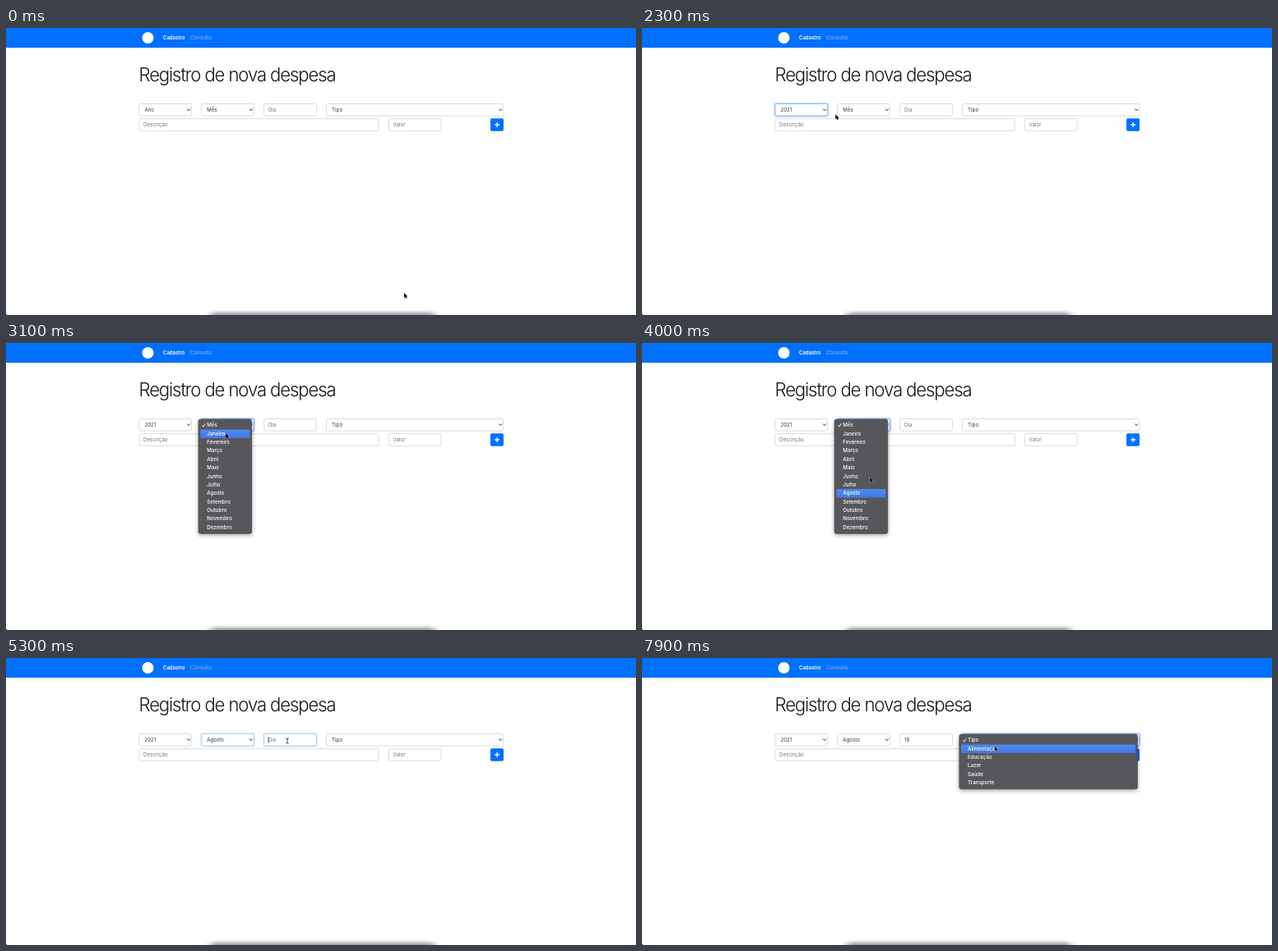
Write an HTML page that moves like this. It is 766x350 px and loops after 8 s.

```html
<!DOCTYPE html>
<html lang="pt">
<head>
<meta charset="utf-8">
<title>Registro de nova despesa</title>
<style>
html, body { margin: 0; width: 100%; height: 100%; overflow: hidden; background: #fff; }
svg { display: block; }
text { font: 6.2px Inter, "Open Sans", sans-serif; fill: #343a40; white-space: pre; }
.title { font-size: 22.2px; font-weight: 300; letter-spacing: -1.15px; fill: #16191c; }
.hint { fill: #6c757d; }
.item { fill: #fff; font-weight: 500; }
.box { fill: #fff; stroke: #ced4da; stroke-width: .8; }
.ring { fill: none; stroke: #007bff; stroke-opacity: .25; stroke-width: 1.4; }
.edge { fill: none; stroke: #80bdff; stroke-width: .8; }
.line { fill: none; stroke-linecap: round; stroke-linejoin: round; }
</style>
</head>
<body>
<svg id="stage" width="766" height="350" viewBox="0 0 766 350">
  <defs>
    <filter id="soft" x="-20%" y="-300%" width="140%" height="700%"><feGaussianBlur stdDeviation="5 2"/></filter>
    <filter id="drop" x="-30%" y="-30%" width="160%" height="170%">
      <feDropShadow dx="0" dy="2" stdDeviation="2.5" flood-opacity=".35"/>
    </filter>
    <linearGradient id="blue" x2="0" y2="1"><stop stop-color="#4f8bf2"/><stop offset="1" stop-color="#3f78e4"/></linearGradient>
  </defs>
  <rect width="766" height="24" fill="#0070ff"/>
  <circle cx="172.5" cy="12" r="7" fill="#fff"/>
  <text x="191" y="14.3" style="fill:#fff;font-weight:600;font-size:6px">Cadastro</text>
  <text x="224" y="14.3" style="fill:#fff;opacity:.55">Consulta</text>
  <text class="title" x="161.5" y="64.5">Registro de nova despesa</text>
  <rect x="248" y="347" width="274" height="12" rx="5" filter="url(#soft)" opacity=".4"/>
  <rect y="349" width="1" height="1" fill="#333"/>
</svg>
<script>
const stage = document.getElementById('stage');
const months = ['Mês', 'Janeiro', 'Fevereiro', 'Março', 'Abril', 'Maio', 'Junho', 'Julho', 'Agosto',
  'Setembro', 'Outubro', 'Novembro', 'Dezembro'];
const kinds = ['Tipo', 'Alimentação', 'Educação', 'Lazer', 'Saúde', 'Transporte'];
const ROW = 10.37;

function add(parent, tag, attrs, text) {
  const el = document.createElementNS('http://www.w3.org/2000/svg', tag);
  for (const k in attrs) el.setAttribute(k, attrs[k]);
  if (text) el.textContent = text;
  parent.append(el);
  return el;
}

function field(x, y, width, label, isSelect) {
  const frame = { x, y, width, height: 14.6, rx: 1.7 };
  add(stage, 'rect', { ...frame, class: 'box' });
  const focus = add(stage, 'g', { opacity: 0 });
  add(focus, 'rect', { x: x - .9, y: y - .9, width: width + 1.8, height: 16.4, rx: 2.4, class: 'ring' });
  add(focus, 'rect', { ...frame, class: 'edge' });
  const text = add(stage, 'text', { x: x + (isSelect ? 6.5 : 5.2), y: y + 9.5, class: isSelect ? '' : 'hint' }, label);
  if (isSelect) add(stage, 'path', {
    d: `M${x + width - 5.2} ${y + 6.4}l1.6 1.8l1.6 -1.8`, class: 'line', stroke: '#222', 'stroke-width': .95 });
  return { text, focus };
}

function menu(x, width, items) {
  const g = add(stage, 'g', {});
  add(g, 'rect', { x, y: 93, width, height: items.length * ROW + 4.6, rx: 2.6,
    fill: '#565559', 'fill-opacity': .98, stroke: '#434246', 'stroke-width': .6, filter: 'url(#drop)' });
  const bar = add(g, 'rect', { x: x + 2.4, width: width - 4.8, height: ROW, fill: 'url(#blue)' });
  items.forEach((s, i) => add(g, 'text', { x: x + 10.3, y: 102.3 + i * ROW, class: 'item' }, s));
  add(g, 'path', { d: `M${x + 4.7} 100.6l1.2 1.6l2.1 -3.6`, class: 'line', stroke: '#fff', 'stroke-width': .9 });
  return (opacity, row) => {
    g.setAttribute('opacity', opacity);
    bar.setAttribute('y', 95.2 + row * ROW);
  };
}

const year = field(161.9, 92.5, 63.7, 'Ano', true);
const month = field(237.8, 92.5, 63.7, 'Mês', true);
const day = field(313.7, 92.5, 63.7, 'Dia');
const kind = field(389.6, 92.5, 215.2, 'Tipo', true);
field(161.9, 110.7, 291.2, 'Descrição');
field(465.3, 110.7, 63.7, 'Valor');
add(stage, 'rect', { x: 589, y: 110.3, width: 16, height: 15.4, rx: 1.7, fill: '#0070ff' });
add(stage, 'path', { d: 'M594.6 118h5M597.1 115.5v5', class: 'line', stroke: '#fff', 'stroke-width': 1.3 });
const caret = add(stage, 'rect', { y: 96.3, width: .7, height: 7.4, fill: '#222' });

const yearMenu = menu(158, 65, ['Ano', '2021']);
const monthMenu = menu(234, 64.8, months);
const kindMenu = menu(385.8, 216.6, kinds);

const arrow = add(stage, 'path', { d: 'M0 0V6.1L1.4 4.8L2.4 7L3.5 6.5L2.5 4.4H4.4Z',
  fill: '#000', stroke: '#fff', 'stroke-width': .55, 'paint-order': 'stroke' });
const beam = add(stage, 'path', { d: 'M-1.4 -3.2Q0 -3.2 0 -2.4Q0 -3.2 1.4 -3.2M0 -2.4V2.4M-1.4 3.2Q0 3.2 0 2.4Q0 3.2 1.4 3.2',
  class: 'line', stroke: '#222', 'stroke-width': .8 });

// pointer stops: time, x, y
const path = [[0, 484, 323], [200, 430, 262], [400, 300, 130], [600, 198, 60], [700, 182, 72], [900, 210, 97],
  [1600, 210, 97], [1900, 205, 109], [2100, 205, 109], [2500, 265.5, 101.5], [3000, 265.5, 101.5],
  [3300, 272, 135], [3700, 277, 184], [3900, 277, 182], [4000, 277, 164], [4200, 308, 122], [4400, 342, 101],
  [7100, 342, 101], [7400, 428, 100.5], [7700, 428, 100.5], [7900, 428.7, 107.5], [8000, 428.7, 107.5]];

const clamp = v => Math.max(0, Math.min(1, v));
const ramp = (t, from, span = 200) => clamp((t - from) / span);
const between = (t, a, b) => t >= a && t < b;
const pulse = (t, on, off) => ramp(t, on) * (1 - ramp(t, off));

function pointer(t) {
  const i = path.findIndex(p => p[0] > t);
  const [a, b] = [path[i - 1], path[i]];
  const k = (t - a[0]) / (b[0] - a[0]);
  const e = k * k * (3 - 2 * k);
  return [a[1] + (b[1] - a[1]) * e, a[2] + (b[2] - a[2]) * e];
}

function draw(t) {
  const [x, y] = pointer(t);
  const hover = Math.max(0, Math.floor((y - 95.2) / ROW));

  year.text.textContent = t < 2000 ? 'Ano' : '2021';
  month.text.textContent = t < 4100 ? 'Mês' : 'Agosto';
  const typed = t < 6300 ? '' : t < 6500 ? '1' : '18';
  day.text.textContent = typed || 'Dia';
  day.text.setAttribute('class', typed ? '' : 'hint');

  year.focus.setAttribute('opacity', pulse(t, 1200, 2450));
  month.focus.setAttribute('opacity', pulse(t, 2400, 5200));
  day.focus.setAttribute('opacity', pulse(t, 5200, 7550));
  kind.focus.setAttribute('opacity', ramp(t, 7500));

  yearMenu(t < 1300 ? 0 : 1 - ramp(t, 1950), Math.min(1, hover));
  monthMenu(t < 2500 ? 0 : 1 - ramp(t, 4050), t < 3700 ? Math.min(8, hover) : 8);
  kindMenu(t < 7600 ? 0 : 1, Math.min(1, hover));

  const blink = between(t, 5300, 5800) || between(t, 6300, 7000);
  caret.setAttribute('opacity', blink ? 1 : 0);
  caret.setAttribute('x', 318.7 + (typed ? day.text.getComputedTextLength() : 0));

  const overDay = between(t, 4300, 7300) && between(x, 314, 378);
  const hidden = between(t, 6300, 7200);
  arrow.setAttribute('opacity', overDay || hidden ? 0 : 1);
  beam.setAttribute('opacity', overDay && !hidden ? 1 : 0);
  for (const el of [arrow, beam]) el.setAttribute('transform', `translate(${x} ${y})`);
}

function tick() {
  draw(Math.floor(performance.now() % 8000 / 100) * 100);
  requestAnimationFrame(tick);
}
tick();
</script>
</body>
</html>
```
